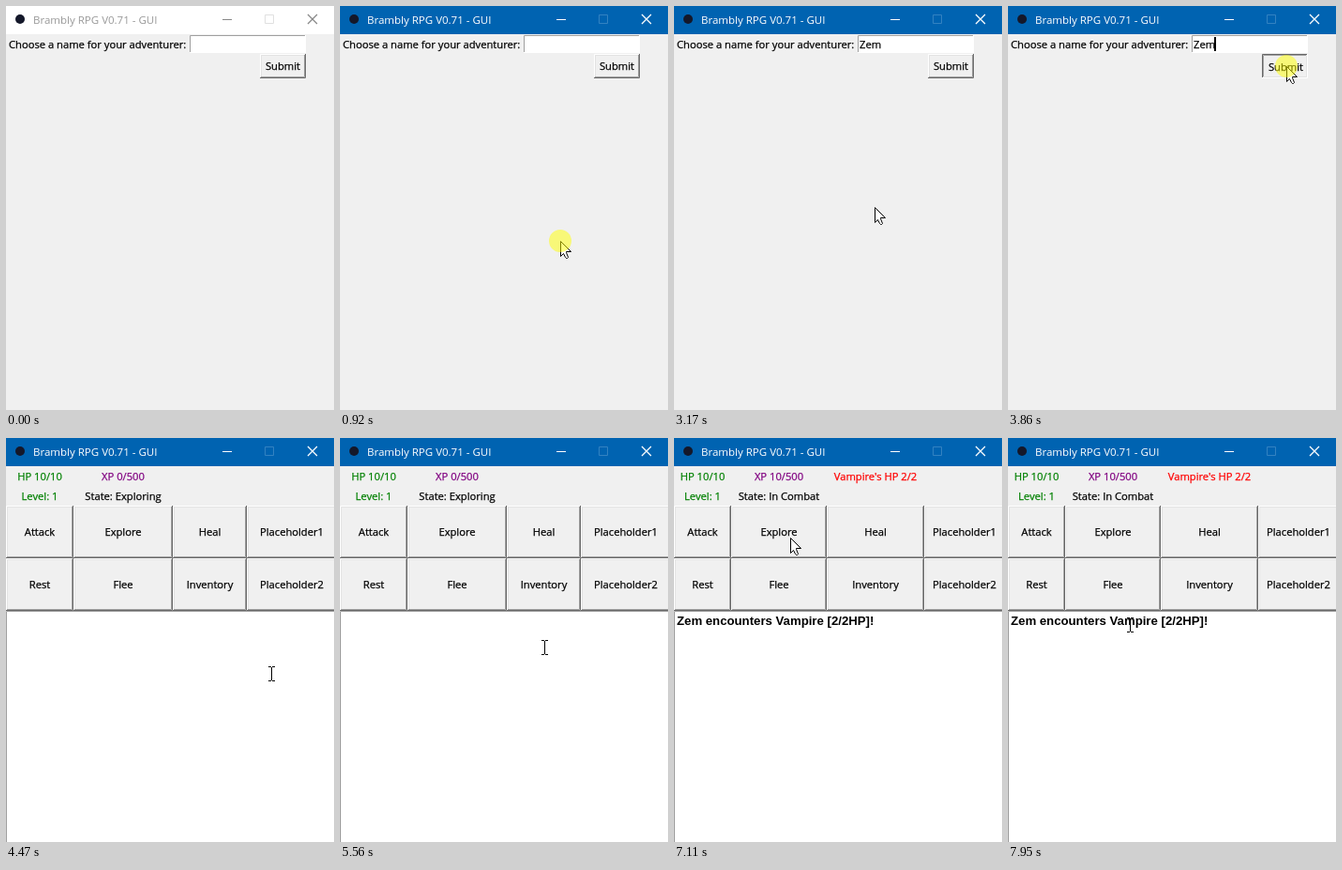
An HTML page that plays this animation: 350 px wide and 430 px high, repeating every 8000 ms.

```html
<!DOCTYPE html>
<html lang="en">
<head>
<meta charset="utf-8">
<title>Adventure GUI</title>
<style>
  html, body { margin: 0; width: 100%; height: 100%; overflow: hidden; background: #f0f0f0; }
  svg { display: block; width: 100vw; height: 100vh; cursor: default; }
  text { font: 11.2px "Open Sans", "Noto Sans", sans-serif; white-space: pre; stroke-width: .25; }
  .title { font-size: 11.5px; stroke-width: 0; }
  .log { font: bold 13.2px "Liberation Sans", Arial, sans-serif; stroke-width: 0; }
  .hi, .hi2, .lo, .lo2 { fill: none; stroke-width: 1; }
  .hi { stroke: #fff; }
  .hi2 { stroke: #e3e3e3; }
  .lo { stroke: #696969; }
  .lo2 { stroke: #a0a0a0; }
  .down .hi { stroke: #696969; }
  .down .hi2 { stroke: #a0a0a0; }
  .down .lo { stroke: #fff; }
  .down .lo2 { stroke: #e3e3e3; }
  .down text { transform: translate(1px, 1px); }
</style>
</head>
<body>
<svg id="stage" viewBox="0 0 350 430"></svg>
<script>
const LOOP = 8000, STEP = 77;
const HERO = "Zem";
const stage = document.getElementById("stage");

function add(parent, tag, attrs, content) {
  const el = document.createElementNS("http://www.w3.org/2000/svg", tag);
  for (const key in attrs) el.setAttribute(key, attrs[key]);
  if (content) el.textContent = content;
  parent.append(el);
  return el;
}
const group = (parent = stage) => add(parent, "g", {});
const rect = (parent, x, y, width, height, fill) => add(parent, "rect", { x, y, width, height, fill });
const label = (parent, x, y, content, fill = "#000", anchor = "middle") =>
  add(parent, "text", { x, y, fill, stroke: fill, "text-anchor": anchor }, content);

// Top-left and bottom-right edges, inset by i pixels.
function edges(parent, x, y, w, h, i, topLeft, bottomRight) {
  const l = x + i + .5, t = y + i + .5, r = x + w - i - .5, b = y + h - i - .5;
  add(parent, "path", { d: `M${l} ${b}V${t}H${r}`, class: topLeft });
  add(parent, "path", { d: `M${l - .5} ${b}H${r}V${t - .5}`, class: bottomRight });
}

function button(parent, x, y, w, h, content) {
  const g = group(parent);
  rect(g, x, y, w, h, "#f0f0f0");
  edges(g, x, y, w, h, 1, "hi2", "lo2");
  edges(g, x, y, w, h, 0, "hi", "lo");
  label(g, x + w / 2, y + h / 2 + 4, content);
  return g;
}

function sunkenField(parent, x, y, w, h) {
  rect(parent, x, y, w, h, "#fff");
  edges(parent, x, y, w, h, 0, "lo2", "hi");
}

function buildTitleBar() {
  const bar = rect(stage, 0, 0, 350, 30, "#fff");
  add(stage, "circle", { cx: 15, cy: 14, r: 5, fill: "#14182a" });
  const name = label(stage, 29, 19, "Brambly RPG V0.71 - GUI", "#999", "start");
  name.setAttribute("class", "title");
  const icon = (d, width = 1) => add(stage, "path", { d, fill: "none", "stroke-width": width });
  const min = icon("M231 14.5h10");
  const max = icon("M276.5 9.5h9v9h-9z");
  const close = icon("M322 9l10 10M332 9l-10 10", 1.3);
  return active => {
    bar.setAttribute("fill", active ? "#0063b1" : "#fff");
    name.setAttribute("fill", active ? "#fff" : "#999");
    for (const el of [min, close]) el.setAttribute("stroke", active ? "#fff" : "#888");
    max.setAttribute("stroke", active ? "#3382c1" : "#e0e0e0");
  };
}

function buildNameScreen() {
  const g = group();
  label(g, 3, 45, "Choose a name for your adventurer:", "#000", "start");
  sunkenField(g, 196, 31, 124, 19);
  const typed = label(g, 198, 45, "", "#000", "start");
  const caret = rect(g, 197, 33, 2, 15, "#000");
  const submit = button(g, 271, 51, 49, 26, "Submit");
  return { g, typed, caret, submit };
}

function buildGameScreen(columns, xp, state) {
  const g = group();
  const center = i => (columns[i] + columns[i + 1]) / 2;
  label(g, center(0), 45, "HP 10/10", "#008000");
  label(g, center(1), 45, xp, "#800080");
  label(g, center(0), 66, "Level: 1", "#008000");
  label(g, center(1), 66, state);
  sunkenField(g, 0, 184, 352, 250);
  const names = ["Attack", "Explore", "Heal", "Placeholder1", "Rest", "Flee", "Inventory", "Placeholder2"];
  const buttons = names.map((name, i) => {
    const c = i % 4;
    return button(g, columns[c], i < 4 ? 72 : 128, columns[c + 1] - columns[c], 56, name);
  });
  return { g, center, explore: buttons[1] };
}

rect(stage, 0, 0, 350, 430, "#f0f0f0");
const setActive = buildTitleBar();
const naming = buildNameScreen();
const exploring = buildGameScreen([0, 72, 178, 257, 353], "XP 0/500", "State: Exploring");
const combat = buildGameScreen([0, 61, 163, 267, 353], "XP 10/500", "State: In Combat");
label(combat.g, combat.center(2), 45, "Vampire's HP 2/2", "#ff0000");
label(combat.g, 3, 199, `${HERO} encounters Vampire [2/2HP]!`, "#000", "start").setAttribute("class", "log");

// The click halo lies over the pointer and tints it.
const pointer = group();
const arrow = add(pointer, "path", {
  d: "M.5 .5V16.5L3.5 13.5L5.5 17.5L6.5 18.5H7.5L8.5 17.5L6.5 12.5V11.5H11.5Z", fill: "#fff", stroke: "#000"
});
const beam = add(pointer, "path", {
  d: "M-1 -7.5H2M3 -7.5H6M2.5 -7V7M-1 7.5H2M3 7.5H6", fill: "none", stroke: "#000"
});
const halo = add(pointer, "circle", { r: 12, fill: "#ff0", "fill-opacity": .5 });

// Pointer moves: start time, number of steps, end point.
const moves = [
  [610, 1, 330, 350], [687, 3, 235, 250], [1150, 4, 239, 28], [1550, 1, 239, 41],
  [1770, 4, 214, 214], [3400, 4, 297, 64], [3940, 4, 319, 109], [4240, 4, 281, 251],
  [5330, 4, 216, 223], [5730, 1, 215, 223], [6260, 1, 212, 227], [6337, 4, 129, 165],
  [6650, 3, 118, 112], [6880, 1, 124, 106], [7490, 3, 122, 165], [7720, 2, 127, 202],
  [7880, 1, 128, 199]
];
const clicks = [[920, 1000], [1550, 1770], [3710, 3870], [7030, 7110]];
const caretOn = [[1620, 2250], [2550, 3170], [3480, 3870]];
const keyTimes = [2400, 2630, 2710];

const within = (t, spans) => spans.some(([from, to]) => t >= from && t < to);
const show = (el, on) => el.setAttribute("visibility", on ? "inherit" : "hidden");

function pointerAt(t) {
  let x = 350, y = 380;
  for (const [start, steps, toX, toY] of moves) {
    if (t < start) break;
    const p = Math.min(1, (Math.floor((t - start + 4) / STEP) + 1) / steps);
    const ease = p * p * (3 - 2 * p);
    x += (toX - x) * ease;
    y += (toY - y) * ease;
  }
  return [Math.round(x), Math.round(y)];
}

function render(t) {
  setActive(t >= 920);
  const onName = t < 3870;
  show(naming.g, onName);
  show(exploring.g, !onName && t < 7110);
  show(combat.g, t >= 7110);

  naming.typed.textContent = HERO.slice(0, keyTimes.filter(k => t >= k).length);
  naming.caret.setAttribute("x", 197 + Math.round(naming.typed.getComputedTextLength()));
  show(naming.caret, within(t, caretOn));

  const clicking = within(t, clicks);
  naming.submit.classList.toggle("down", clicking && t > 3000);
  exploring.explore.classList.toggle("down", clicking && t > 7000);

  const [x, y] = pointerAt(t);
  const overText = onName ? x > 196 && x < 320 && y > 31 && y < 50 : y > 184;
  pointer.setAttribute("transform", `translate(${x} ${y})`);
  show(pointer, t >= 610);
  show(halo, clicking);
  show(arrow, !overText);
  show(beam, overText);
}

const begin = performance.now();
function tick() {
  render((performance.now() - begin) % LOOP);
  requestAnimationFrame(tick);
}
tick();
</script>
</body>
</html>
```
